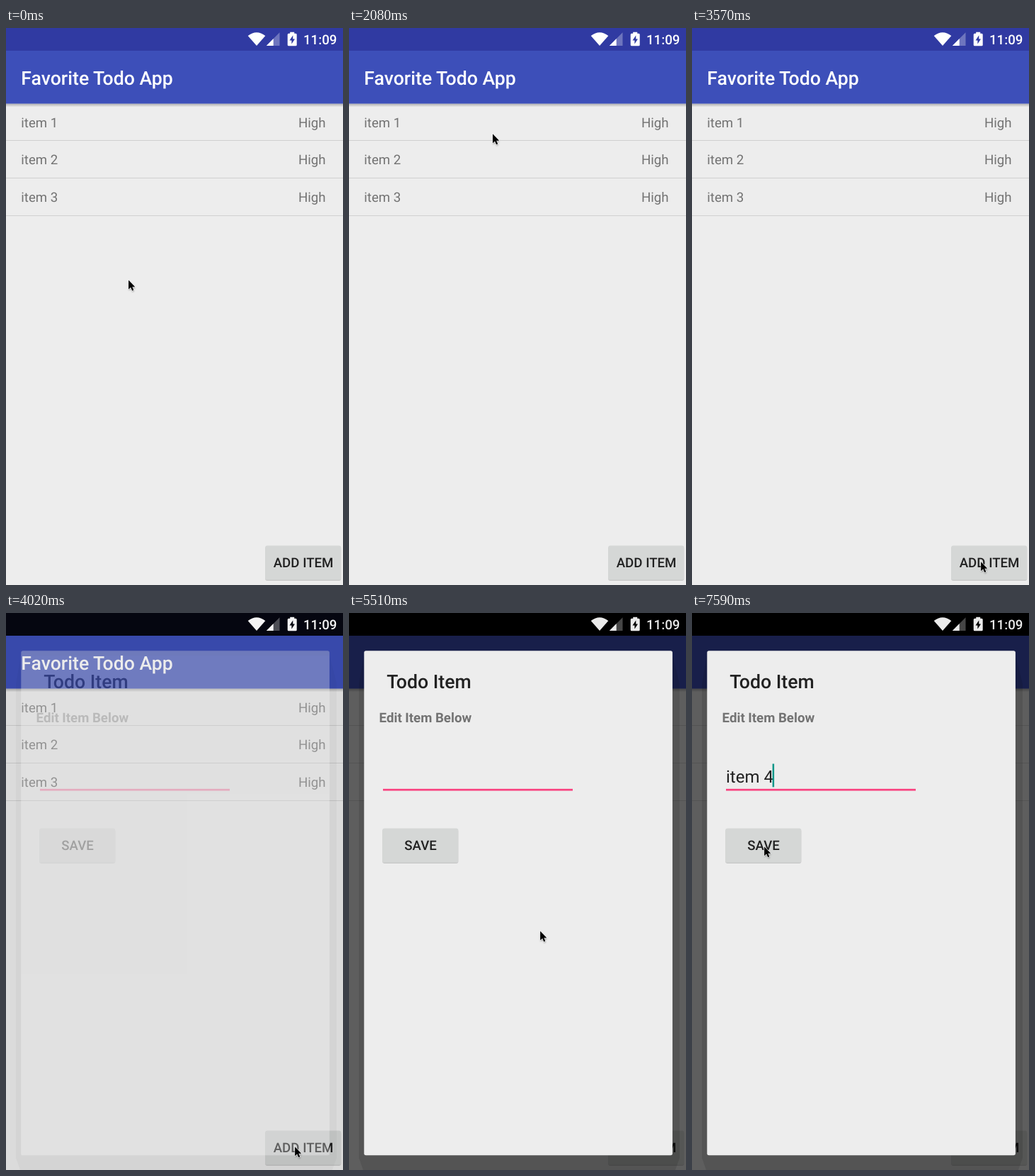
Recreate the animation shown at these times as an HTML page. Size 476 px wide and 785 px high, loop 8000 ms.

```html
<!DOCTYPE html>
<html lang="en">
<head>
<meta charset="utf-8">
<title>Todo app</title>
<style>
html, body { margin: 0; width: 100%; height: 100%; overflow: hidden; background: #ededed; }
svg { display: block; width: 100%; height: 100%; }
text { font-family: Roboto, sans-serif; font-size: 18.67px; white-space: pre; text-rendering: geometricPrecision; }
.med { font-weight: 500; }
.big { font-size: 26.67px; font-weight: 500; }
.dark { fill: #212121; }
.grey { fill: #737373; }
</style>
</head>
<body>
<svg viewBox="0 0 476 785">
  <defs>
    <linearGradient id="fade" x2="0" y2="1">
      <stop offset="0" stop-opacity=".27"/>
      <stop offset="1" stop-opacity="0"/>
    </linearGradient>
    <filter id="soft" x="-50%" y="-50%" width="200%" height="200%">
      <feGaussianBlur stdDeviation=".9"/>
    </filter>
  </defs>

  <rect width="476" height="785" fill="#ededed"/>
  <g id="list"></g>
  <rect y="106.5" width="476" height="5" fill="url(#fade)"/>
  <rect y="32" width="476" height="74.6" fill="#3d4fb9"/>
  <text class="big" x="21.2" y="79.6" fill="#fff">Favorite Todo App</text>
  <g id="add"></g>

  <rect id="dim" width="476" height="785"/>
  <path id="shade" fill-rule="evenodd" d="M21 60L14 100V768L20 785H461L467 768V100L457 60ZM21.3 53.3V764.3H456.9V53.3Z"/>

  <rect width="476" height="32" fill="#303aa2"/>
  <rect id="night" width="476" height="32"/>
  <g id="icons" fill="#fff">
    <path d="M341.7 11Q354 1.6 366.3 11L354 25Z"/>
    <path d="M367.8 25V25L386.5 6.3V25Z" opacity=".3"/>
    <path d="M367.8 25L377.7 15.1V25Z"/>
    <path fill-rule="evenodd" d="M401.2 5.8H407.2V7.8H409.2Q410.7 7.8 410.7 9.3V23.8Q410.7 25.3 409.2 25.3H399.2Q397.7 25.3 397.7 23.8V9.3Q397.7 7.8 399.2 7.8H401.2ZM405.3 10.3L400.5 17.4H403.4V22.6L408 15.4H405.3Z"/>
    <text class="med" x="420" y="22.8">11:09</text>
  </g>

  <g id="dialog">
    <rect x="21.3" y="53.3" width="435.6" height="711" rx="2.67" fill="#ededed"/>
    <text class="big dark" x="53.3" y="105.8">Todo Item</text>
    <text class="grey" x="42.6" y="154.4" font-weight="700">Edit Item Below</text>
    <text id="field" class="dark" x="48" y="238.5" style="font-size:24px"></text>
    <rect x="48" y="247.8" width="268" height="2.7" fill="#f9417f"/>
    <rect id="caret" y="212.5" width="2.5" height="32.8" fill="#0b9688"/>
    <g id="save"></g>
  </g>

  <g id="cursor">
    <g transform="translate(.5 .7) scale(.92)">
      <path d="M.5 1V15.5L4 12.5 6.3 17.6 8.8 16.5 6.6 11.5H11Z" transform="translate(.4 1.2)" opacity=".4" filter="url(#soft)"/>
      <path d="M.7 .7V14.8L4 11.8 6.2 16.9 8.5 15.9 6.3 10.9H10.6Z" stroke="#fff" stroke-width="1.1" paint-order="stroke"/>
    </g>
  </g>
</svg>
<script>
const $ = id => document.getElementById(id);
const set = (id, name, value) => $(id).setAttribute(name, value);
const clamp = (v, lo, hi) => Math.min(hi, Math.max(lo, v));
const LOOP = 8000, STEP = 148.8;
const OPEN = 28, TYPE = 40, TYPED = 44, BLINK = 3;
const ENTRY = 'item 4';

const button = (x, y, tx, label) => `
  <rect x="${x}" y="${y + 1.4}" width="107" height="48.2" rx="2.67" opacity=".16"/>
  <rect x="${x}" y="${y}" width="107" height="48.4" rx="2.67" fill="#d5d7d6"/>
  <text class="med dark" x="${tx}" y="${y + 30.9}">${label}</text>`;

$('list').innerHTML = [0, 1, 2].map(i => {
  const y = 139.7 + i * 52.67;
  return `<text class="grey" x="21.3" y="${y}">item ${i + 1}</text>
    <text class="grey" x="413" y="${y}">High</text>
    <rect y="${158 + i * 53}" width="476" height="1" fill="#d0d0d0"/>`;
}).join('');
$('add').innerHTML = button(366.2, 729.4, 377.7, 'ADD ITEM');
$('save').innerHTML = button(47.3, 303.4, 78.2, 'SAVE');

// each pointer stroke is a Bezier curve that starts where the last one ended
const home = [172, 354];
const strokes = [
  { from: 1, to: 9, curve: [[150, 230], [72, 55], [88, 131]] },
  { from: 9, to: 16, curve: [[14, 286], [238, 92], [256, 150]] },
  { from: 16, to: 19, curve: [[258, 260], [282, 600], [284, 657]] },
  { from: 20, to: 24, curve: [[310, 690], [390, 745], [407, 751]] },
  { from: 29, to: 32, curve: [[395, 740], [290, 470], [269, 447]] },
  { from: 46, to: 51, curve: [[250, 400], [150, 335], [101, 328]] }
];

function bezier(a, [b, c, d], u) {
  const v = 1 - u;
  return a.map((p, i) => v * v * v * p + 3 * v * v * u * b[i] + 3 * v * u * u * c[i] + u * u * u * d[i]);
}

const pointer = k => strokes.reduce(
  (at, s) => bezier(at, s.curve, clamp((k - s.from) / (s.to - s.from), 0, 1)), home);

function draw(t) {
  const k = Math.floor((t + 10) / STEP);

  const open = clamp((k - OPEN + 2) / 2, 0, 1);
  const shown = open ** 1.7;
  set('dim', 'opacity', .6 * open ** 3);
  set('shade', 'opacity', .1 * shown);
  set('dialog', 'opacity', shown);
  set('night', 'opacity', open ** .15);
  set('icons', 'opacity', 1 - .08 * open);

  const progress = clamp((k - TYPE + 1) / (TYPED - TYPE + 1), 0, 1);
  const field = $('field');
  field.textContent = ENTRY.slice(0, Math.ceil(progress * ENTRY.length));
  const width = field.textContent ? field.getComputedTextLength() : 0;

  // the blink restarts with every key
  const since = k - (k < TYPE ? OPEN : Math.min(k, TYPED));
  set('caret', 'x', 47.5 + Math.max(0, width - .8));
  set('caret', 'opacity', Math.floor(since / BLINK) % 2 ? 0 : 1);
  set('cursor', 'transform', `translate(${pointer(k)})`);
}

const begin = performance.now();
function tick() {
  draw((performance.now() - begin) % LOOP);
  requestAnimationFrame(tick);
}
tick();
</script>
</body>
</html>
```
